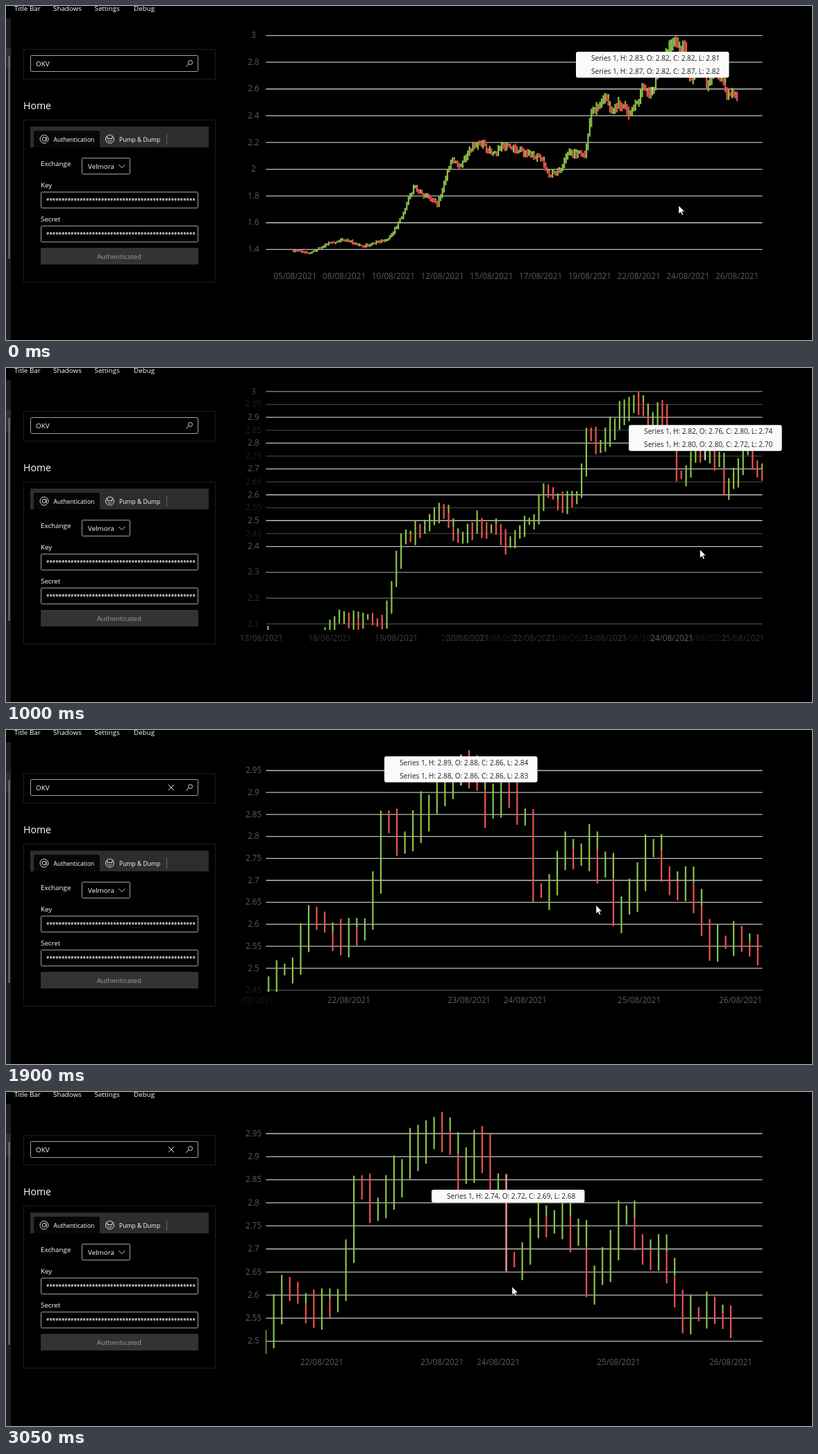
An HTML page that plays this animation: 1161 by 482 pixels, repeating every 3.1 s.

```html
<!DOCTYPE html>
<html lang="en">
<head>
<meta charset="utf-8">
<title>Candlestick zoom</title>
<style>
html, body { margin: 0; width: 100%; height: 100%; overflow: hidden; background: #000; }
svg { display: block; width: 1161px; height: 482px; font: 500 9.8px "Open Sans", "Noto Sans", sans-serif; fill: #fff; }
.box { fill: none; stroke: #a0a0a0; }
.card { fill: none; stroke: #1b1b1b; }
.icon { fill: none; stroke: #ddd; stroke-width: 1; }
.tab { font-size: 8.6px; }
.stars { font-size: 8px; font-weight: 600; }
.axis text { font-size: 11.7px; font-weight: 400; fill: #5c5c5c; text-anchor: middle; }
.axis line { stroke: #bdbdbd; stroke-width: 1.3; }
.bars path { fill: none; stroke-width: 2.2; }
.tip text { font-size: 10.1px; font-weight: 400; fill: #222; }
</style>
</head>
<body>
<svg viewBox="0 0 1161 482">
  <defs>
    <clipPath id="plot"><rect x="374" y="25" width="716" height="353"/></clipPath>
    <clipPath id="foot"><rect x="338" y="370" width="788" height="40"/></clipPath>
    <clipPath id="field"><rect x="52" y="260" width="221.500" height="90"/></clipPath>
  </defs>
  <rect width="1161" height="482" fill="#000"/>

  <g id="panel">
    <rect y="18" width="7" height="464" fill="#1f1f1f"/>
    <rect y="60" width="7" height="31" fill="#2e2e2e"/>
    <rect x="3.500" y="72" width="2" height="293" rx="1" fill="#777"/>
    <text x="12" y="7">Title Bar</text>
    <text x="68" y="7">Shadows</text>
    <text x="127.500" y="7">Settings</text>
    <text x="184" y="7">Debug</text>

    <rect class="card" x="25.500" y="62.500" width="276" height="43"/>
    <rect class="box" x="35.500" y="71.500" width="241" height="23" rx="1"/>
    <text x="43" y="87">OKV</text>
    <path class="icon" d="M259.500 87.500l3.600-3.600"/>
    <circle class="icon" cx="265.500" cy="81.500" r="3"/>
    <path id="clear" class="icon" d="M234 79l8 8m0-8l-8 8"/>
    <path id="caret" class="icon" d="M64.500 77v13"/>

    <text x="25" y="149" style="font-size:14.1px">Home</text>
    <rect class="card" x="25.500" y="164.500" width="276" height="234"/>
    <rect x="35" y="174" width="257" height="30" fill="#2d2d2d"/>
    <path d="M40 204v-21q0-3 3-3h89q3 0 3 3v21z" fill="#070707"/>
    <path class="icon" d="M58 189v4.500q0 2 1.500 2t1.500-3.500a6 6 0 1 0-2.500 5"/>
    <circle class="icon" cx="55" cy="192" r="2.800"/>
    <circle class="icon" cx="149.500" cy="192" r="6"/>
    <path class="icon" d="M146 188v3.500h7v-3.500m-6.500 5.500q3 3.500 6 0"/>
    <text class="tab" x="68.500" y="195.500">Authentication</text>
    <text class="tab" x="163" y="195.500">Pump &amp; Dump</text>
    <path d="M231.500 184v16" stroke="#666"/>

    <text x="50" y="230.500">Exchange</text>
    <rect class="box" x="109.500" y="219.500" width="69" height="23" rx="1"/>
    <text x="118" y="235">Velmora</text>
    <path class="icon" d="M162.500 229l4.500 4.500l4.500-4.500" stroke-width=".8"/>
    <text x="50" y="262">Key</text>
    <rect class="box" x="50.500" y="268.500" width="226" height="23" rx="1"/>
    <text x="50" y="311">Secret</text>
    <rect class="box" x="50.500" y="317.500" width="226" height="23" rx="1"/>
    <g clip-path="url(#field)">
      <text class="stars" x="58" y="284">*************************************************</text>
      <text class="stars" x="58" y="333">*************************************************</text>
    </g>
    <rect x="50" y="349" width="227" height="24" rx="1" fill="#333"/>
    <text x="163" y="365" text-anchor="middle" style="fill:#a0a0a0">Authenticated</text>
  </g>

  <g id="ticks" class="axis"></g>
  <g id="dates" class="axis" clip-path="url(#foot)"></g>
  <g class="bars" clip-path="url(#plot)">
    <path id="up" stroke="#8bc34a"/>
    <path id="down" stroke="#ef5350"/>
    <path id="hot" stroke="#fff" opacity=".45"/>
  </g>
  <g id="tip" class="tip">
    <rect id="tipBox" width="220.500" rx="3" fill="#fafafa"/>
    <text id="row0" x="22" y="13"></text>
    <text id="row1" x="22" y="31.700"></text>
  </g>
  <path id="mouse" d="M0 0v12l2.800-2.600l1.900 4.300l1.900-.8l-1.900-4.200h3.800z" fill="#fff" stroke="#000" stroke-width=".5"/>
</svg>

<script>
const LOOP = 3100, STEP = 50;
const $ = id => document.getElementById(id);
const clamp = v => Math.max(0, Math.min(1, v));
const mix = (a, b, u) => a + (b - a) * u;

// peak: x of candle 0, gap: candle spacing, top: y of 2.95, unit: px per 1.0
const keys = [
  { t: 0, peak: 965.3, gap: 2.44, top: 51.7, unit: 193, mouse: [969, 288], tip: [821, 66],
    rows: ['2.83 2.82 2.82 2.81', '2.87 2.82 2.87 2.82'] },
  { t: 700, peak: 954, gap: 3.9, top: 49.8, unit: 254, mouse: [992, 268], tip: [878, 79],
    rows: ['2.74 2.72 2.69 2.68'] },
  { t: 1250, peak: 877, gap: 10.93, top: 54, unit: 513, mouse: [1006, 257], tip: [913, 85],
    rows: ['2.82 2.76 2.80 2.74', '2.80 2.80 2.72 2.70'] },
  { t: 1650, peak: 824, gap: 11.5, top: 54, unit: 543, mouse: [722, 262], tip: [734, 32],
    rows: ['2.92 2.92 2.91 2.90', '2.92 2.91 2.91 2.90'] },
  { t: 1900, peak: 667, gap: 11.55, top: 58, unit: 634, mouse: [850, 253], tip: [545, 38],
    rows: ['2.89 2.88 2.86 2.84', '2.88 2.86 2.86 2.83'] },
  { t: 2250, peak: 629.3, gap: 11.55, top: 59.5, unit: 664, mouse: [901, 286], tip: [820, 125],
    rows: ['2.75 2.72 2.74 2.71', '2.79 2.74 2.78 2.71'] },
  { t: 3050, peak: 628.2, gap: 11.55, top: 59.5, unit: 666, mouse: [729, 281], tip: [613, 141],
    rows: ['2.74 2.72 2.69 2.68'] }
];

// Key points of the closing price: candle number (0 is the peak), price
const path = [
  [-227, 1.39], [-216, 1.37], [-204, 1.45], [-195, 1.47], [-185, 1.42], [-171, 1.47], [-165, 1.56],
  [-155, 1.86], [-148, 1.8], [-141, 1.73], [-133, 2.05], [-127, 2.03], [-120, 2.18], [-113, 2.18],
  [-109, 2.11], [-100, 2.18], [-88, 2.11], [-79, 2.07], [-75, 1.95], [-68, 2], [-64, 2.12], [-54, 2.1],
  [-50, 2.42], [-42, 2.54], [-38, 2.44], [-34, 2.5], [-27, 2.41], [-22, 2.51], [-20, 2.63], [-16, 2.56],
  [-13, 2.6], [-11, 2.84], [-9, 2.79], [-3, 2.92], [0, 2.95], [2, 2.85], [5, 2.91], [7, 2.85], [8, 2.67],
  [10, 2.69], [12, 2.78], [17, 2.74], [18, 2.61], [22, 2.77], [27, 2.69], [30, 2.55], [34, 2.57], [36, 2.53]
];

let seed = 7;
const rand = () => (seed = seed * 16807 % 2147483647) / 2147483647;

// Each candle opens at the last close; wicks and wobble grow with the price
const candles = [];
let last = path[0][1];
for (let s = 0; s < path.length - 1; s++) {
  const [i0, v0] = path[s], [i1, v1] = path[s + 1];
  for (let i = i0 + 1; i <= i1; i++) {
    const base = mix(v0, v1, (i - i0) / (i1 - i0));
    const size = (base - 1) * 0.026;
    const close = i === i1 ? base : base + (rand() - 0.5) * size * 1.4;
    const hi = Math.max(last, close) + size * (0.2 + rand() * 0.8);
    const lo = Math.min(last, close) - size * (0.2 + rand() * 0.8);
    // Part of a falling bar may show a rising one behind it
    const split = close > last ? 1 : rand() < 0.35 ? 0.35 : 0;
    candles.push({ i, hi, lo, split });
    last = close;
  }
}

function make(tag, parent, text) {
  const el = document.createElementNS('http://www.w3.org/2000/svg', tag);
  if (text) el.textContent = text;
  return parent.appendChild(el);
}
const set = (el, attrs) => { for (const a in attrs) el.setAttribute(a, attrs[a]); };

// Price ticks: even tenths, then all tenths, then halves
const ticks = [];
for (let n = 140; n <= 300; n += 5) {
  const level = n % 20 === 0 ? 0 : n % 10 === 0 ? 1 : 2;
  if (n < [140, 190, 240][level]) continue;
  const v = n / 100;
  const out = n === 300 ? 900 : n < 235 ? 250 + (v - 1.4) * 720 : n < 250 ? 1645 : LOOP;
  const line = make('line', $('ticks'));
  set(line, { x1: 374.5, x2: 1089.5 });
  ticks.push({ v, level, start: [-200, 450, 950][level], out, line, label: make('text', $('ticks'), String(v)) });
}

// Date labels: wide grid, shifted grid, then single days
const dates = [];
function addDate(at, start, out = LOOP, kind = '') {
  const day = Math.ceil(25.78 - (36 - at) / 12.43);
  const text = String(day).padStart(2, '0') + '/08/2021';
  dates.push({ at, start, out, kind, el: make('text', $('dates'), text) });
}
const leave = i => i > 30 ? 440 : i > -40 ? 800 : 200 + (i + 225) * 3.9;
for (let i = -225; i <= 36; i += 29) addDate(i, -200, i === 7 ? LOOP : leave(i));
for (let i = -123; i <= 22; i += 29) addDate(i, 500, leave(i), 'early');
for (const i of [-37, -29, -15, 0]) addDate(i, 950, i < -20 ? 1550 : LOOP);
addDate(22, 950, LOOP, 'sliding');
addDate(36, 1350, LOOP, 'sliding');

const fade = (d, t) => clamp((t - d.start) / 150) * clamp(1 - (t - d.out) / 400);

function draw(t) {
  let k = 0;
  while (k < keys.length - 2 && t >= keys[k + 1].t) k++;
  const a = keys[k], b = keys[k + 1];
  const u = clamp((t - a.t) / (b.t - a.t));
  const e = a.t >= 1900 ? 1 - (1 - u) ** 2 : u;
  const grow = name => a[name] * (b[name] / a[name]) ** e;
  const move = name => [0, 1].map(n => mix(a[name][n], b[name][n], u));

  const peak = grow('peak'), gap = grow('gap'), top = grow('top'), unit = grow('unit');
  const X = i => peak + i * gap;
  const Y = v => top + (2.95 - v) * unit;
  // New ticks wait at their final place while the old ones travel
  const fresh = clamp((1000 - t) / 300);

  for (const d of ticks) {
    let y = Y(d.v);
    if (d.level === 1) y = mix(y, 61 + (2.9 - d.v) * 272, fresh);
    const opacity = y > 388 || y < 20 ? 0 : fade(d, t);
    set(d.line, { y1: y + 0.5, y2: y + 0.5, opacity: y > 380 ? 0 : opacity });
    set(d.label, { x: 356.5, y: y + 4.2, opacity });
  }

  const slid = clamp((t - 1250) / 720);
  for (const d of dates) {
    let x = X(d.kind === 'sliding' ? mix(14, d.at, slid) : d.at);
    if (d.kind === 'early') x = mix(x, 951.5 + 4.1 * d.at, fresh);
    x = Math.max(x, t < 1300 ? 368 : 355);
    if (t < 1300) x = Math.min(x, 1085);
    set(d.el, { x, y: 394, opacity: fade(d, t) });
  }

  const [tx, ty] = move('tip');
  const hotBar = Math.round((tx + 110 - peak) / gap);
  const paths = { up: '', down: '', hot: '' };
  for (const c of candles) {
    const x = X(c.i);
    if (x < 372 || x > 1091) continue;
    const y0 = Y(c.hi), y1 = Y(c.lo), cut = mix(y0, y1, c.split);
    const bar = (from, to) => from < to ? `M${x.toFixed(2)} ${from.toFixed(2)}V${to.toFixed(2)}` : '';
    paths.up += bar(y0, cut);
    paths.down += bar(cut, y1);
    if (c.i === hotBar) paths.hot = bar(y0, y1);
  }
  for (const id in paths) set($(id), { d: paths[id] });

  const rows = (u < 0.5 ? a : b).rows;
  set($('tip'), { transform: `translate(${tx} ${ty})` });
  set($('tipBox'), { height: rows.length > 1 ? 37.5 : 18.5 });
  for (const n of [0, 1]) {
    const [h, o, c, l] = (rows[n] || '').split(' ');
    $('row' + n).textContent = rows[n] ? `Series 1, H: ${h}, O: ${o}, C: ${c}, L: ${l}` : '';
  }
  set($('mouse'), { transform: `translate(${move('mouse')})` });

  set($('clear'), { opacity: t >= 1500 ? 1 : 0 });
  set($('caret'), { opacity: t >= 1600 && t % 400 < 200 ? 1 : 0 });
}

function frame() {
  draw(Math.floor(performance.now() % LOOP / STEP) * STEP);
  requestAnimationFrame(frame);
}
frame();
</script>
</body>
</html>
```
